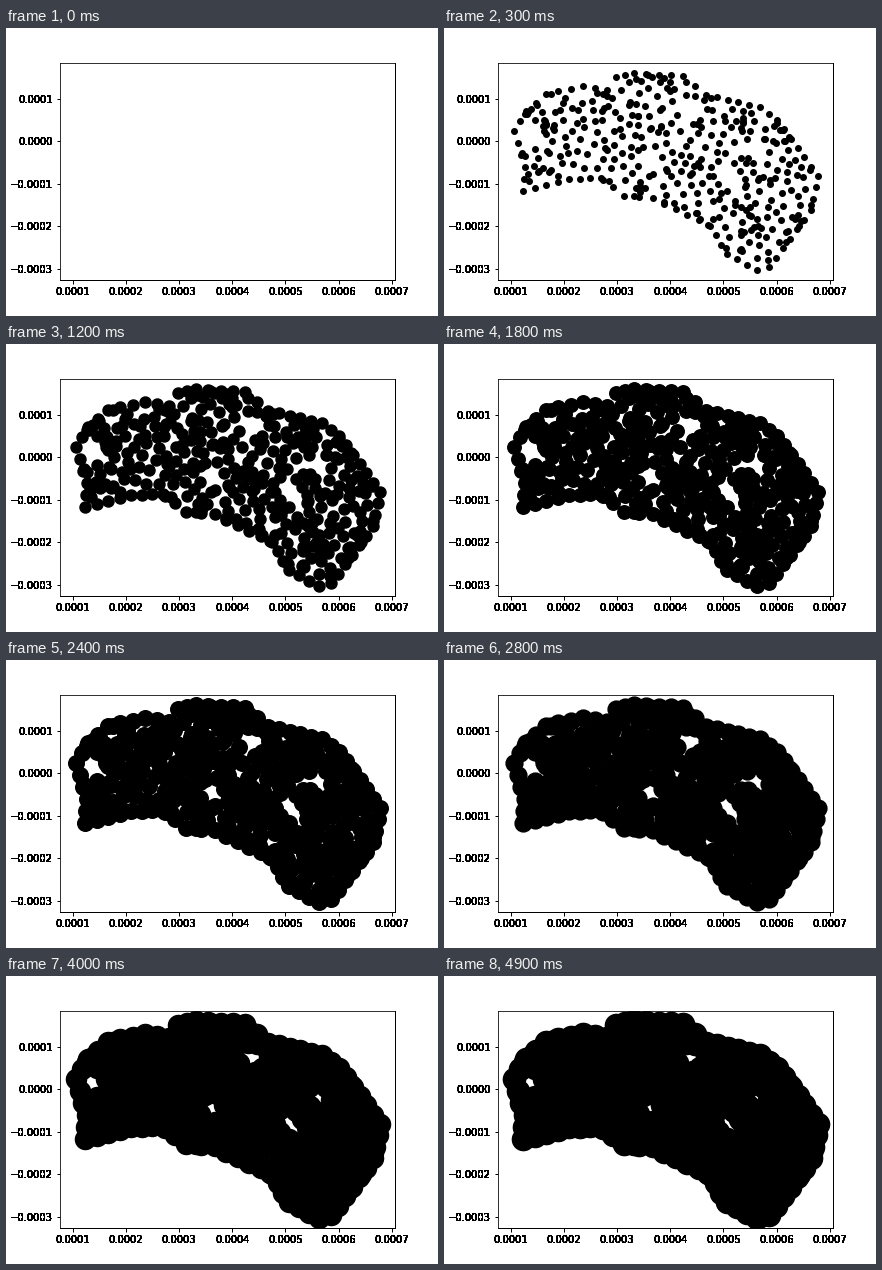
Write a matplotlib script that moves like this. It is 432 px wide and 288 px high and loops after 5000 ms.

```python
import numpy as np
import matplotlib.pyplot as plt
from matplotlib.animation import FuncAnimation
from matplotlib.path import Path

WIDTH, HEIGHT, DPI = 432, 288, 72
FRAMES, INTERVAL = 50, 100
LEFT, BOTTOM, AX_WIDTH, AX_HEIGHT = BOX = (0.125, 0.125, 0.775, 0.755)
EDGE_SPACING = 12
RANDOM_POINTS, FILL_POINTS = 250, 70
LABEL_PASSES = 30  # overlaid passes give the labels their heavy, hard edges

plt.rcParams.update({"font.family": "DejaVu Sans", "font.size": 10})

# Key points of the cloud's edge, clockwise, in stage pixels
EDGE = np.array([
    (70, 103), (82, 83), (102, 66), (139, 58), (163, 62), (172, 49),
    (190, 45), (239, 48), (262, 67), (316, 79), (333, 92), (374, 148),
    (367, 182), (325, 239), (313, 242), (283, 226), (266, 198), (209, 170),
    (180, 168), (157, 150), (125, 151), (79, 163), (81, 139),
])

# Centres of the widest gaps between the dots
GAPS = np.array([(206, 131), (283, 146), (312, 121), (244, 80), (89, 109)])
GAP_RADIUS = 12.3


def distances(points, centres):
    return np.linalg.norm(points[:, None] - centres[None], axis=2)


def edge_points():
    """Dots along the edge: every key point plus evenly spaced ones between."""
    points = []
    for start, end in zip(EDGE, np.roll(EDGE, -1, axis=0)):
        count = max(1, round(np.hypot(*(end - start)) / EDGE_SPACING))
        points.extend(start + (end - start) * k / count for k in range(count))
    return np.array(points)


def make_cloud():
    rng = np.random.default_rng(12)
    spread = rng.uniform(EDGE.min(axis=0), EDGE.max(axis=0), (6000, 2))
    clear = (distances(spread, GAPS) > GAP_RADIUS).all(axis=1)
    spread = spread[Path(EDGE).contains_points(spread) & clear]
    cloud = np.vstack([edge_points(), spread[:RANDOM_POINTS]])

    # Close the widest remaining holes
    pool = spread[RANDOM_POINTS:]
    nearest = distances(pool, cloud).min(axis=1)
    for _ in range(FILL_POINTS):
        point = pool[nearest.argmax()]
        cloud = np.vstack([cloud, point])
        nearest = np.minimum(nearest, np.linalg.norm(pool - point, axis=1))
    return cloud


def draw_repeatedly(label):
    draw_once = label.draw

    def draw(renderer):
        for _ in range(LABEL_PASSES):
            draw_once(renderer)

    label.draw = draw


fig = plt.figure(figsize=(WIDTH / DPI, HEIGHT / DPI), dpi=DPI, facecolor="white")
ax = fig.add_axes(BOX)
ax.set_xticks(np.arange(1, 8) / 1e4)
ax.set_yticks(np.arange(-3, 2) / 1e4)
ax.set_xlim(0.7602e-4, 7.0573e-4)
ax.set_ylim(-3.26e-4, 1.856e-4)
ax.tick_params(width=1)
ax.spines[["right", "bottom"]].set_linewidth(1)
for label in ax.get_xticklabels() + ax.get_yticklabels():
    draw_repeatedly(label)

x, y = make_cloud().T
dots = ax.scatter((x / WIDTH - LEFT) / AX_WIDTH,
                  (1 - y / HEIGHT - BOTTOM) / AX_HEIGHT,
                  s=10, c="black", linewidths=1.5, transform=ax.transAxes)


def update(frame):
    dots.set_visible(frame > 0)
    dots.set_sizes([10 * frame])
    return (dots,)


anim = FuncAnimation(fig, update, frames=FRAMES, interval=INTERVAL,
                     init_func=lambda: update(0), repeat=True, repeat_delay=0)
plt.show()
```
